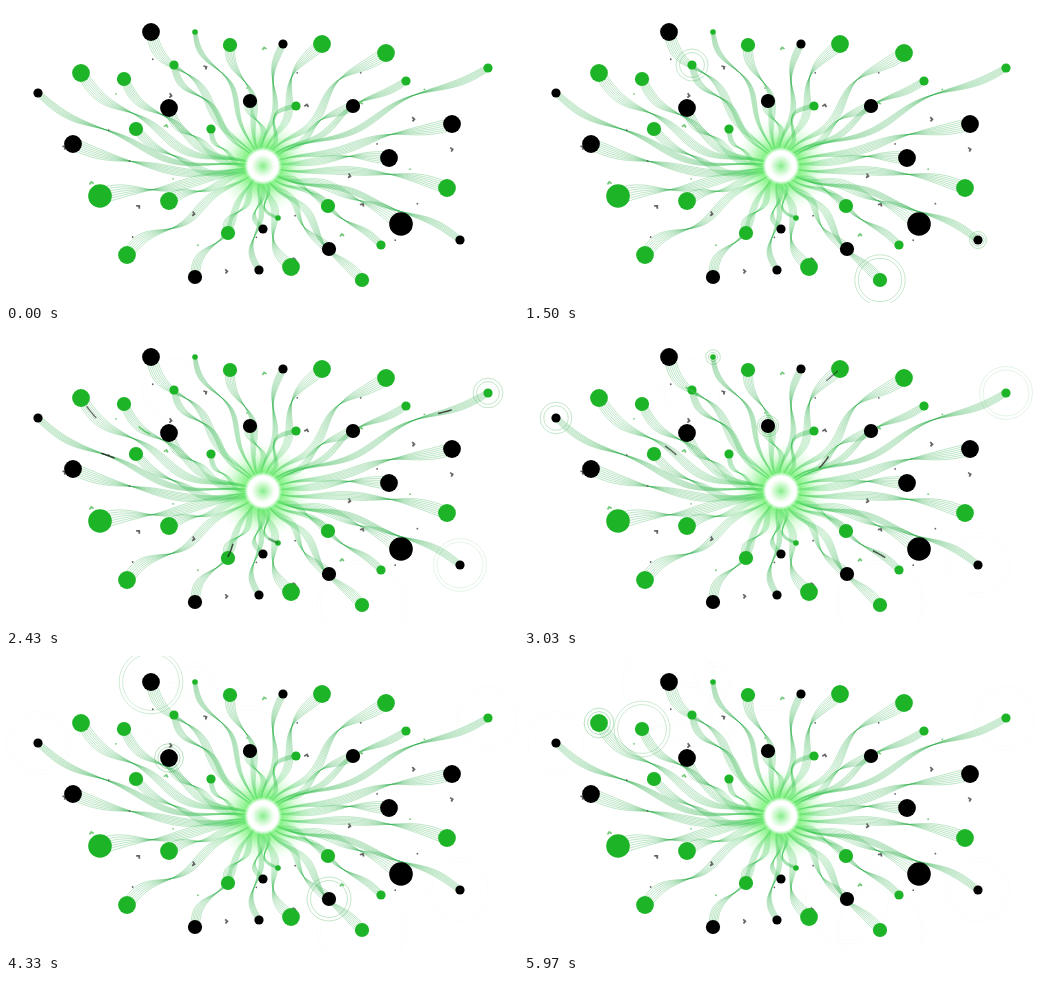
These frames come from a looping animation (512 px wide and 297 px high, 6.01 s). An HTML page with a canvas:

```html
<!DOCTYPE html>
<html>
<head>
<meta charset="utf-8">
<style>
html, body { margin: 0; width: 100%; height: 100%; overflow: hidden; background: #fff; }
canvas { display: block; }
</style>
</head>
<body>
<canvas id="stage" width="512" height="297"></canvas>
<script>
const LOOP = 6010, W = 512, H = 297, CX = 257, CY = 160;
const GREEN = '#1eb428', BLACK = '#000';
const TINY = 2.8, SMALL = 4.6, MEDIUM = 7.1, LARGE = 8.9, HUGE = 11.8;

const group = (color, r, ...points) => points.map(([x, y]) => {
  const dx = x - CX, dy = y - CY;
  return { x, y, r, color, dx, dy, length: Math.hypot(dx, dy), angle: Math.atan2(dy, dx) };
});

const nodes = [
  ...group(GREEN, SMALL, [482, 62], [400, 75], [168, 59], [290, 100], [205, 123], [375, 239]),
  ...group(GREEN, MEDIUM, [224, 39], [118, 73], [130, 123], [222, 227], [356, 274], [322, 200]),
  ...group(GREEN, LARGE, [316, 38], [380, 47], [75, 67], [163, 195], [121, 249], [285, 261], [441, 182]),
  ...group(GREEN, HUGE, [94, 190]),
  ...group(GREEN, TINY, [189, 26], [272, 212]),
  ...group(BLACK, SMALL, [277, 38], [32, 87], [454, 234], [257, 223], [253, 264]),
  ...group(BLACK, MEDIUM, [244, 95], [347, 100], [323, 243], [189, 271]),
  ...group(BLACK, LARGE, [163, 102], [446, 118], [383, 152], [67, 138], [145, 26]),
  ...group(BLACK, HUGE, [395, 218])
];

// node index, start in ms
const ripples = [[10, 830], [2, 910], [24, 1300], [0, 1900], [23, 2450], [20, 2650],
  [27, 2900], [35, 3480], [29, 3780], [31, 4130], [7, 5200], [14, 5750]];

const pulses = Array.from({ length: 12 }, (_, i) => ({
  node: nodes[(23 + i * 7) % nodes.length],
  start: 1780 + i * 130,
  color: i % 4 === 3 ? '#3cc04c' : '#222'
}));

// Directions in which tendrils sway: degrees, spread, sway at 1/3 and at 2/3 of the way
const sways = [[200, 22, -20, -17], [305, 20, -2, -13], [15, 20, -2, -9], [75, 28, 2, 8], [250, 15, 3, 5]];

function sway(angle) {
  let near = 0, far = 0;
  for (const [at, spread, a, b] of sways) {
    const diff = (angle * 180 / Math.PI - at + 900) % 360 - 180;
    const weight = Math.exp(-((diff / spread) ** 2));
    near += a * weight;
    far += b * weight;
  }
  return [near, far];
}

// Point on strand k (-1..1) of a tendril; u runs from the core (0) to the node (1)
function strand({ dx, dy, r, length, angle }, u, k) {
  const s = n => Math.sin(n * Math.PI * u);
  const [near, far] = sway(angle);
  const bend = ((near + far) * s(1) + (near - far) * s(2)) / 1.732
    + 4 * Math.sin(angle) * s(3) + Math.sin(2 * angle) * length / 45 * s(4);
  const width = u * (r * 0.65 + Math.min(4, length / 40) * s(1)) * Math.cos(5 * (1 - u));
  const off = bend + k * width;
  return [CX + dx * u - dy / length * off, CY + dy * u + dx / length * off];
}

function trace(g, node, k, from, to, steps) {
  g.beginPath();
  for (let i = 0; i <= steps; i++) g.lineTo(...strand(node, from + (to - from) * i / steps, k));
  g.stroke();
}

function disc(g, x, y, r, fill) {
  g.fillStyle = fill;
  g.beginPath();
  g.arc(x, y, r, 0, 7);
  g.fill();
}

function radial(g, r, stops) {
  const grad = g.createRadialGradient(CX, CY, 0, CX, CY, r);
  stops.forEach(([at, color]) => grad.addColorStop(at / r, color));
  return grad;
}

const glow = (g, r, stops) => disc(g, CX, CY, r, radial(g, r, stops));

// Dots and small notched chevrons, spread like sunflower seeds
function scatter(g) {
  for (let i = 8; i < 42; i++) {
    const a = i * 2.4, d = Math.sqrt(i / 42);
    const x = CX + 210 * d * Math.cos(a), y = CY - 8 + 118 * d * Math.sin(a);
    const color = i % 3 ? '#666' : '#74c97c';
    if (i % 2) {
      disc(g, x, y, 0.9, color);
      continue;
    }
    g.save();
    g.translate(x, y);
    g.rotate(Math.sin(i));
    g.fillStyle = color;
    g.beginPath();
    [[-2, -1.7], [2, -1.7], [2, 2], [0.3, 2], [0, 0], [-2, 0]].forEach(p => g.lineTo(...p));
    g.fill();
    g.restore();
  }
}

function drawBase() {
  const c = document.createElement('canvas');
  c.width = W;
  c.height = H;
  const g = c.getContext('2d');
  g.fillStyle = '#fff';
  g.fillRect(0, 0, W, H);
  glow(g, 48, [[0, '#78ee78'], [18, 'rgba(120,240,120,.9)'],
    [30, 'rgba(150,244,150,.45)'], [48, 'rgba(200,255,200,0)']]);
  g.strokeStyle = radial(g, 230, [[0, 'rgba(60,215,80,.5)'], [40, 'rgba(50,195,75,.55)'],
    [90, 'rgba(36,170,66,.6)'], [230, 'rgba(36,170,66,.6)']]);
  g.lineWidth = 0.5;
  for (const n of nodes) for (let k = -3; k <= 3; k++) trace(g, n, k / 3, 0.06, 1, 48);
  glow(g, 34, [[0, 'rgba(130,242,130,.7)'], [17, 'rgba(130,242,130,.6)'], [34, 'rgba(160,248,160,0)']]);
  glow(g, 19, [[0, '#86ec8a'], [4, '#b4f5b6'], [10, '#f2fdf2'], [12, '#fff'],
    [15, '#fff'], [19, 'rgba(255,255,255,0)']]);
  scatter(g);
  nodes.forEach(n => disc(g, n.x, n.y, n.r, n.color));
  return c;
}

const ctx = document.getElementById('stage').getContext('2d');
const base = drawBase();

function drawRipple([index, start], t) {
  if (t < start) return;
  const { x, y, r } = nodes[index];
  const age = Math.min(1.4, (t - start) / 1000), p = age / 1.4;
  const grown = age * Math.min(27, r * 4.2);
  ctx.strokeStyle = `rgba(50,170,70,${0.45 * (1 - p * p) + 0.04})`;
  ctx.lineWidth = 0.7;
  for (const inset of [0, Math.min(3.5, grown * 0.6)]) {
    ctx.beginPath();
    ctx.arc(x, y, r + grown - inset, 0, 7);
    ctx.stroke();
  }
}

// A short dash that runs from the node towards the core and fades
function drawPulse({ node, start, color }, t) {
  const age = (t - start) / 1000;
  const u = 1 - age * 120 / node.length, half = 7 / node.length;
  if (age < 0 || age > 0.9 || u < half) return;
  ctx.globalAlpha = Math.min(0.8, 0.35 + age * 2, (0.9 - age) * 4);
  ctx.strokeStyle = color;
  ctx.lineWidth = 1.5;
  trace(ctx, node, 0, u - half, Math.min(1, u + half), 6);
  ctx.globalAlpha = 1;
}

function frame(now) {
  const t = now % LOOP;
  ctx.drawImage(base, 0, 0);
  ripples.forEach(r => drawRipple(r, t));
  pulses.forEach(p => drawPulse(p, t));
  requestAnimationFrame(frame);
}
requestAnimationFrame(frame);
</script>
</body>
</html>
```
